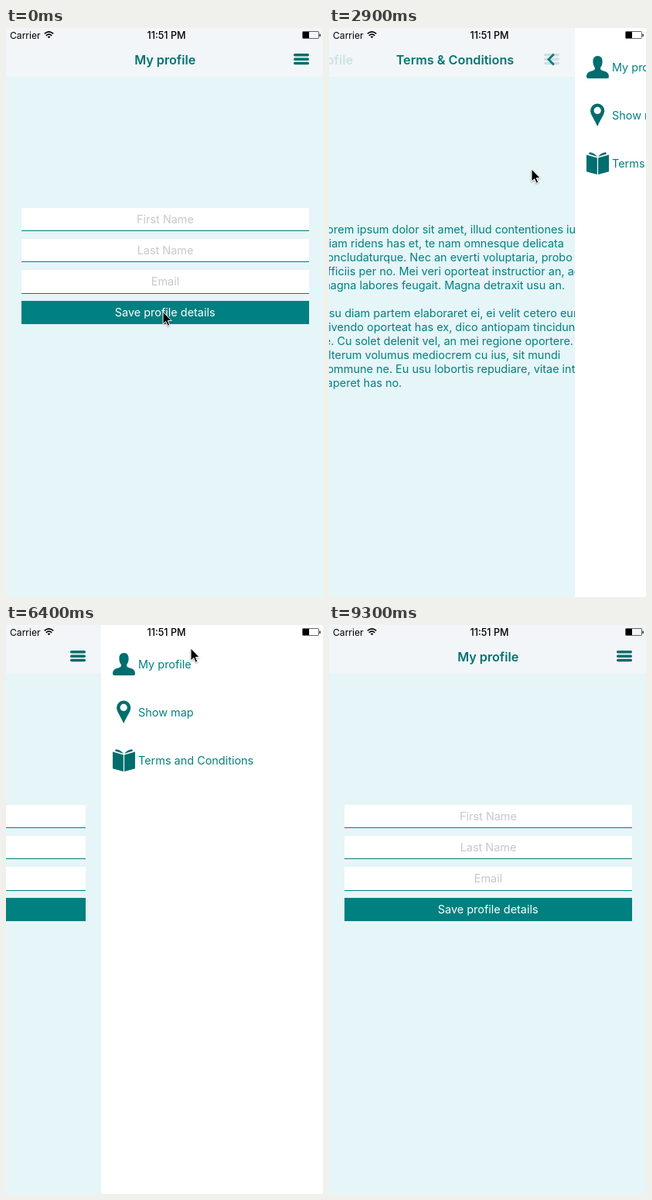
Write an HTML page that moves like this. It is 410 px wide and 734 px high and loops after 9500 ms.

```html
<!DOCTYPE html>
<html lang="en">
<head>
<meta charset="utf-8">
<title>Profile app</title>
<style>
  html, body { margin: 0; width: 100%; height: 100%; overflow: hidden; background: #fff; }
  svg { display: block; width: 410px; height: 734px; }
  text { font: 400 14.45px Inter, Roboto, sans-serif; fill: #008080; white-space: pre; }
  .title { font-size: 16.2px; font-weight: 600; fill: #007272; text-anchor: middle; }
  .hint { fill: #c7c7cd; text-anchor: middle; }
  .light { fill: #fff; text-anchor: middle; }
  .status text { font-size: 12.1px; fill: #000; }
  .status .clock { font-size: 12.6px; font-weight: 500; text-anchor: middle; }
  .icon { fill: #006e6e; }
  #cursor { filter: drop-shadow(0 1px 1px rgba(0, 0, 0, .35)); }
</style>
</head>
<body>
<svg viewBox="0 0 410 734">
  <g id="page">
    <rect width="412" height="734" fill="#e5f5f8"/>
    <g id="profile"></g>
    <g id="terms"><rect width="412" height="734" fill="#e5f5f8"/></g>
    <rect width="412" height="63" fill="#f2f6f8"/>
    <text id="profileTitle" class="title" x="205.7" y="47">My profile</text>
    <text id="termsTitle" class="title" x="206.2" y="47">Terms &amp; Conditions</text>
    <path id="burger" d="M373.7 34.8H390.3M373.7 40.2H390.3M373.7 45.6H390.3" stroke="#006e6e" stroke-width="3.5" stroke-linecap="round"/>
    <path id="back" d="M384.8 33.8L378 40.6L384.8 47.4" fill="none" stroke="#007272" stroke-width="2.8"/>
  </g>

  <g id="drawer">
    <rect width="412" height="734" fill="#fff"/>
    <g class="icon">
      <path transform="translate(15 36)" d="M14.5 0C18.6 0 20.8 3 20.6 7.5C20.5 11 19.6 13.2 18.2 15C17.6 17.4 18.6 18.4 21.5 19.2C26.5 20.5 29 22 29 27Q29 29 27 29H2Q0 29 0 27C0 22 2.5 20.5 7.5 19.2C10.4 18.4 11.4 17.4 10.8 15C9.4 13.2 8.5 11 8.4 7.5C8.2 3 10.4 0 14.5 0Z"/>
      <path transform="translate(20 97)" fill-rule="evenodd" d="M9.2 0.5A9 9 0 0 1 18.3 9.6C18.3 15 13 21 9.2 30C5.4 21 0.1 15 0.1 9.6A9 9 0 0 1 9.2 0.5ZM9.2 4.8A4.6 4.6 0 1 0 9.2 14A4.6 4.6 0 1 0 9.2 4.8Z"/>
      <path transform="translate(15 160)" d="M0 3.5L13.9 7.6V29L0 25.2ZM29 3.5L15.1 7.6V29L29 25.2ZM3 2.6L4 0.2Q11 1.4 13.9 6ZM26 2.6L25 0.2Q18 1.4 15.1 6Z"/>
    </g>
    <g id="menu"></g>
  </g>

  <g class="status">
    <text x="5" y="14">Carrier</text>
    <text x="207.5" y="14" class="clock">11:51 PM</text>
    <g fill="none" stroke="#000" stroke-width="1.7">
      <path d="M49.8 7.4Q55.5 2.4 61.2 7.4M51.8 9.8Q55.5 6.6 59.2 9.8"/>
      <path d="M55.5 13.2L53.6 11.2Q55.5 9.7 57.4 11.2Z" fill="#000" stroke="none"/>
    </g>
    <rect x="383.5" y="4.5" width="21" height="9" rx="1" fill="none" stroke="#000" stroke-width=".6"/>
    <rect x="384" y="5" width="8" height="8"/>
    <rect x="405.5" y="7.5" width="1.2" height="3.5" rx=".6"/>
  </g>

  <path id="cursor" d="M0 0V16L3.7 12.6L6.2 18.2L8.7 17.1L6.3 11.6H11.2Z" stroke="#fff" stroke-width="1"/>
</svg>

<script>
const LOOP = 9500, STEP = 100;
const PAGE_W = 412, OPEN = 289;
const SLIDE_MS = 372, PUSH_MS = 495, TRAVEL_MS = 700;

const $ = id => document.getElementById(id);

$('profile').innerHTML = ['First Name', 'Last Name', 'Email'].map((label, i) => {
  const top = 232 + i * 40, bottom = Math.round(262 + i * 40.4);
  return `<rect x="20" y="${top}" width="372" height="${bottom - top}" fill="#fff"/>
    <rect x="20" y="${bottom - 1}" width="372" height="1" fill="#008080"/>
    <text class="hint" x="206" y="${top + 20.2}">${label}</text>`;
}).join('') + `<rect x="20" y="352" width="372" height="30" fill="#008080"/>
  <text class="light" x="205.7" y="372.2">Save profile details</text>`;

$('menu').innerHTML = ['My profile', 'Show map', 'Terms and Conditions'].map((label, i) =>
  `<text x="48" y="${55.5 + i * 62}">${label}</text>`).join('');

$('terms').innerHTML += `Lorem ipsum dolor sit amet, illud contentiones ius ea.
Diam ridens has et, te nam omnesque delicata
concludaturque. Nec an everti voluptaria, probo
officiis per no. Mei veri oporteat instructior an, ad mel
magna labores feugait. Magna detraxit usu an.

Usu diam partem elaboraret ei, ei velit cetero eum.
Vivendo oporteat has ex, dico antiopam tincidunt sed
te. Cu solet delenit vel, an mei regione oportere.
Alterum volumus mediocrem cu ius, sit mundi
commune ne. Eu usu lobortis repudiare, vitae integre
saperet has no.`.split('\n').map((line, i) =>
  `<text x="20" y="${265.2 + i * 17.95}">${line}</text>`).join('');

// Tap times: open the menu, pick the terms page, go back
const visits = [
  { menu: 1625, pick: 2670, back: 4300 },
  { menu: 5200, pick: 7100, back: 8700 }
];

// Pointer stops: arrival time, x, y
const stops = [
  [300, 203, 366], [600, 353, 142], [1200, 381, 40], [2550, 262, 182],
  [3700, 376, 42], [4800, 370, 48], [5700, 300, 75], [6000, 70, 130],
  [6400, 239, 30], [7000, 245, 170], [8200, 366, 57], [9200, 392, -26]
];

const smooth = u => u * u * (3 - 2 * u);
const easeOut = u => 1 - (1 - u) ** 3;
const mix = (a, b, u) => a + (b - a) * u;
const ramp = (t, start, ms) => Math.min(1, Math.max(0, (t - start) / ms));
const total = f => visits.reduce((sum, v) => sum + f(v), 0);

function pointer(t) {
  let [at, x, y] = stops[0];
  for (const [time, nx, ny] of stops.slice(1)) {
    const ms = Math.min(TRAVEL_MS, time - at);
    const u = smooth(ramp(t, time - ms, ms));
    x = mix(x, nx, u);
    y = mix(y, ny, u);
    at = time;
  }
  return [x, y];
}

function move(id, x, y = 0) {
  $(id).setAttribute('transform', `translate(${x.toFixed(2)} ${y.toFixed(2)})`);
}

function fade(id, alpha) {
  $(id).setAttribute('opacity', Math.min(1, alpha).toFixed(3));
}

function render(t) {
  const open = total(v => smooth(ramp(t, v.menu, SLIDE_MS)) - smooth(ramp(t, v.pick, SLIDE_MS)));
  const push = total(v => easeOut(ramp(t, v.pick, PUSH_MS)) - easeOut(ramp(t, v.back, PUSH_MS)));
  const press = total(v => Math.max(0, 1 - Math.abs(t - v.menu - 75) / 200));
  const shift = -Math.round(OPEN * open);

  move('page', shift);
  move('drawer', PAGE_W + shift);
  move('profile', -123 * push);
  move('terms', PAGE_W * (1 - push));
  move('profileTitle', -142 * push);
  move('termsTitle', 331 * (1 - push));
  fade('profileTitle', 1 - push);
  fade('termsTitle', push * 1.15);
  fade('burger', (1 - push) * (1 - .58 * press));
  fade('back', push * 1.1);
  move('cursor', ...pointer(t));
}

function tick() {
  const t = performance.now() % LOOP;
  render(Math.floor(t / STEP) * STEP);
  requestAnimationFrame(tick);
}
tick();
</script>
</body>
</html>
```
